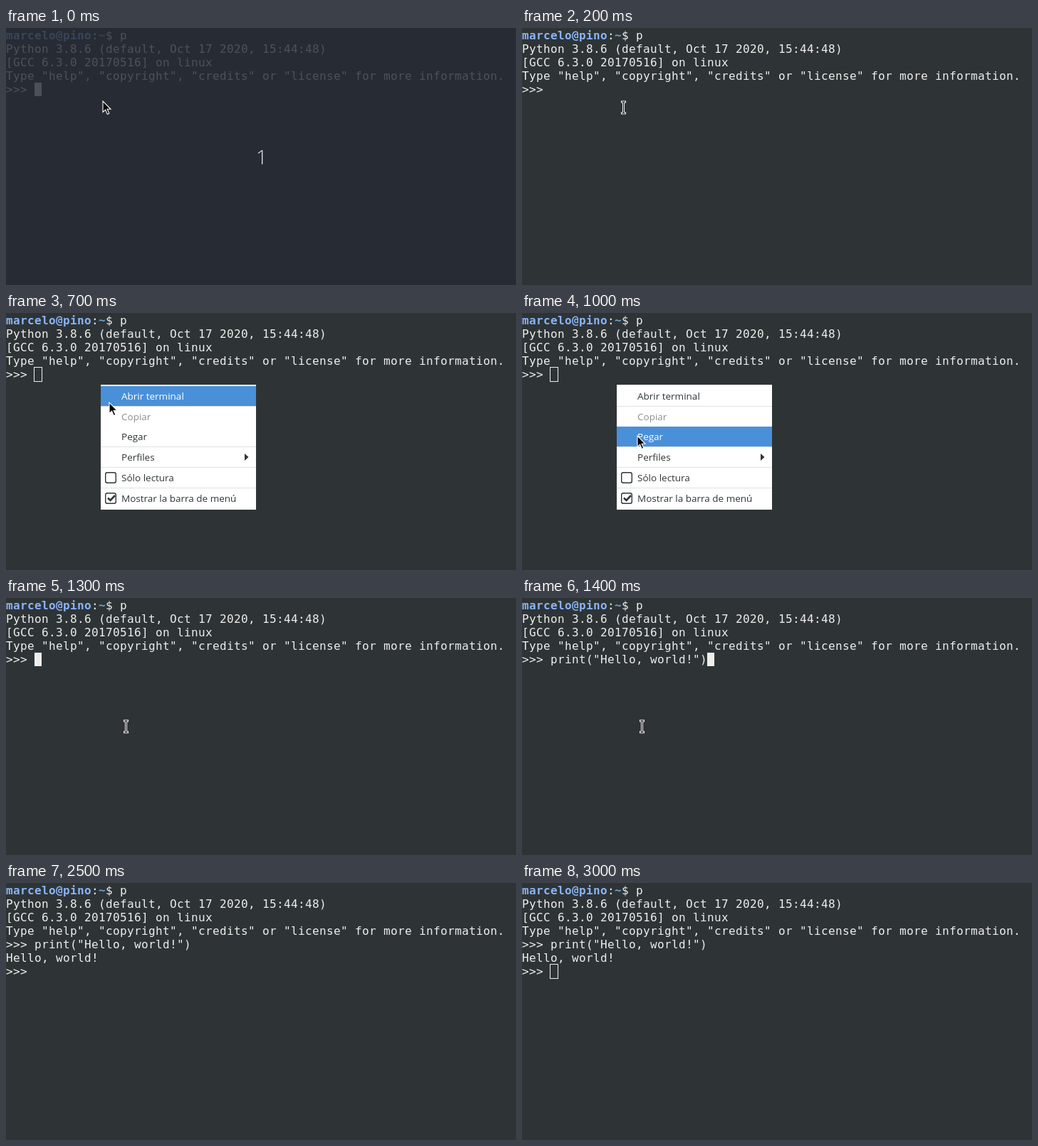
Animation, 716 px wide and 362 px high, one loop 3100 ms. Source, as an HTML page:

```html
<!DOCTYPE html>
<html lang="es">
<head>
<meta charset="utf-8">
<title>Terminal</title>
<style>
html, body { margin: 0; width: 100%; height: 100%; overflow: hidden; background: #2e3436; }
#stage { position: relative; width: 716px; height: 362px; overflow: hidden; background: #2e3436; }
#term {
  position: absolute; left: 0; top: 1px; margin: 0; color: #eeeeec;
  font: 16px/19px "DejaVu Sans Mono", monospace;
  letter-spacing: calc(10px - 1ch); font-variant-ligatures: none;
}
#term b { color: #8ab4f8; }
#term i { color: #729fcf; font-style: normal; font-weight: bold; }
svg { position: absolute; left: 0; top: 0; }
svg text { font-family: "Open Sans", "Noto Sans", sans-serif; font-size: 13.5px; fill: #2e3436; }
.off { fill: #8b8e8f; }
.item rect.bar { fill: none; }
.item.hover rect.bar { fill: #4a90d9; }
.item.hover text { fill: #fff; }
.box { fill: #fff; stroke: #2e3436; stroke-width: 1.4; }
#count { font-size: 28px; font-weight: 300; fill: #e4e4e2; text-anchor: middle; }
</style>
</head>
<body>
<div id="stage">
<pre id="term"><b>marcelo@pino</b>:<i>~</i>$ p
Python 3.8.6 (default, Oct 17 2020, 15:44:48)
[GCC 6.3.0 20170516] on linux
Type "help", "copyright", "credits" or "license" for more information.
&gt;&gt;&gt; <span id="typed"></span></pre>
<svg width="716" height="362" viewBox="0 0 716 362">
  <rect id="block" width="10" height="19" fill="#eeeeec"/>
  <rect id="frame" width="11" height="20" fill="none" stroke="#eeeeec"/>
  <g id="menu">
    <rect x="133" y="101" width="218" height="176" fill="#fff"/>
    <g id="items"></g>
    <path d="M133 131.5H351M133 188.5H351M133 217.5H351M133 246.5H351" stroke="#dfe1e0"/>
    <path d="M335 198l5.500 5l-5.500 5z" fill="#2e3436"/>
    <rect class="box" x="139.700" y="224.700" width="14.600" height="14.600" rx="2.500"/>
    <rect class="box" x="139.700" y="253.700" width="14.600" height="14.600" rx="2.500"/>
    <path d="M143 260.500l3.500 3.500l6.500 -7" fill="none" stroke="#2e3436" stroke-width="2.600"/>
  </g>
  <g id="veil">
    <rect width="716" height="362" fill="#262a33" opacity=".8"/>
    <text id="count" x="359" y="192">1</text>
  </g>
  <path id="arrow" d="M0 0V15.500L3.600 12.200L6.300 18.400L8.800 17.300L6.100 11.300H11Z" fill="#000" stroke="#fff" stroke-width="1.100"/>
  <g id="beam" fill="none">
    <path d="M-3 -8H4M.5 -8V8M-3 8H4" stroke="#fff" stroke-width="3"/>
    <path d="M-2 -8H3M.5 -8V8M-2 8H3" stroke="#000"/>
  </g>
</svg>
</div>
<script>
const LOOP = 3100;
const $ = id => document.getElementById(id);

const labels = [
  ["Abrir terminal", 103], ["Copiar", 132, "off"], ["Pegar", 160],
  ["Perfiles", 189], ["Sólo lectura", 218], ["Mostrar la barra de menú", 247]
];
$("items").innerHTML = labels.map(([label, y, kind = ""]) =>
  `<g class="item"><rect class="bar" x="133" y="${y}" width="218" height="28"/>` +
  `<text class="${kind}" x="162" y="${y + 19}">${label}</text></g>`).join("");
const items = [...$("items").children];

const command = 'print("Hello, world!")';
const typed = ["", command, command + "\nHello, world!\n>>> "];

// Each step changes only what it names; cursor and pointer are [shape, x, y].
const steps = [
  { t: 0, veil: 1, text: 0, menu: false, hover: -1, cursor: ["block", 4, 4], pointer: ["arrow", 136, 103] },
  { t: 100, veil: 0.35 },
  { t: 200, veil: 0, cursor: [], pointer: ["beam", 142, 112] },
  { t: 400, menu: true, cursor: ["frame", 4, 4], pointer: ["arrow", 136, 104] },
  { t: 600, hover: 0, pointer: ["arrow", 138, 110] },
  { t: 700, pointer: ["arrow", 145, 126] },
  { t: 800, hover: -1, pointer: ["arrow", 153, 147] },
  { t: 900, hover: 2, pointer: ["arrow", 159, 165] },
  { t: 1000, pointer: ["arrow", 162, 173] },
  { t: 1300, menu: false, hover: -1, cursor: ["block", 4, 4], pointer: ["beam", 168, 181] },
  { t: 1400, text: 1, cursor: ["block", 26, 4] },
  { t: 1900, text: 2, cursor: ["block", 4, 6], pointer: [] },
  { t: 2500, cursor: [] },
  { t: 2600, pointer: ["beam", 142, 108] },
  { t: 2700, pointer: ["beam", 122, 47] },
  { t: 2800, pointer: [] },
  { t: 3000, cursor: ["frame", 4, 6] }
];
const states = [];
for (const step of steps) states.push({ ...states[states.length - 1], ...step });

function show(ids, [shape, x, y]) {
  for (const id of ids) $(id).style.display = id === shape ? "" : "none";
  if (shape) $(shape).setAttribute("transform", `translate(${x} ${y})`);
}

function cell([shape, col, row]) {
  const shift = shape === "frame" ? 0.5 : 0;
  return [shape, col * 10 - shift, row * 19 + 1 - shift];
}

function draw(s) {
  $("typed").textContent = typed[s.text];
  $("veil").style.opacity = s.veil;
  $("menu").style.display = s.menu ? "" : "none";
  items.forEach((item, i) => item.classList.toggle("hover", i === s.hover));
  show(["block", "frame"], cell(s.cursor));
  show(["arrow", "beam"], s.pointer);
}

const start = performance.now();
let current;
function tick() {
  const time = (performance.now() - start) % LOOP;
  const state = states.findLast(s => s.t <= time) || states[0];
  if (state !== current) draw(current = state);
  requestAnimationFrame(tick);
}
tick();
</script>
</body>
</html>
```
